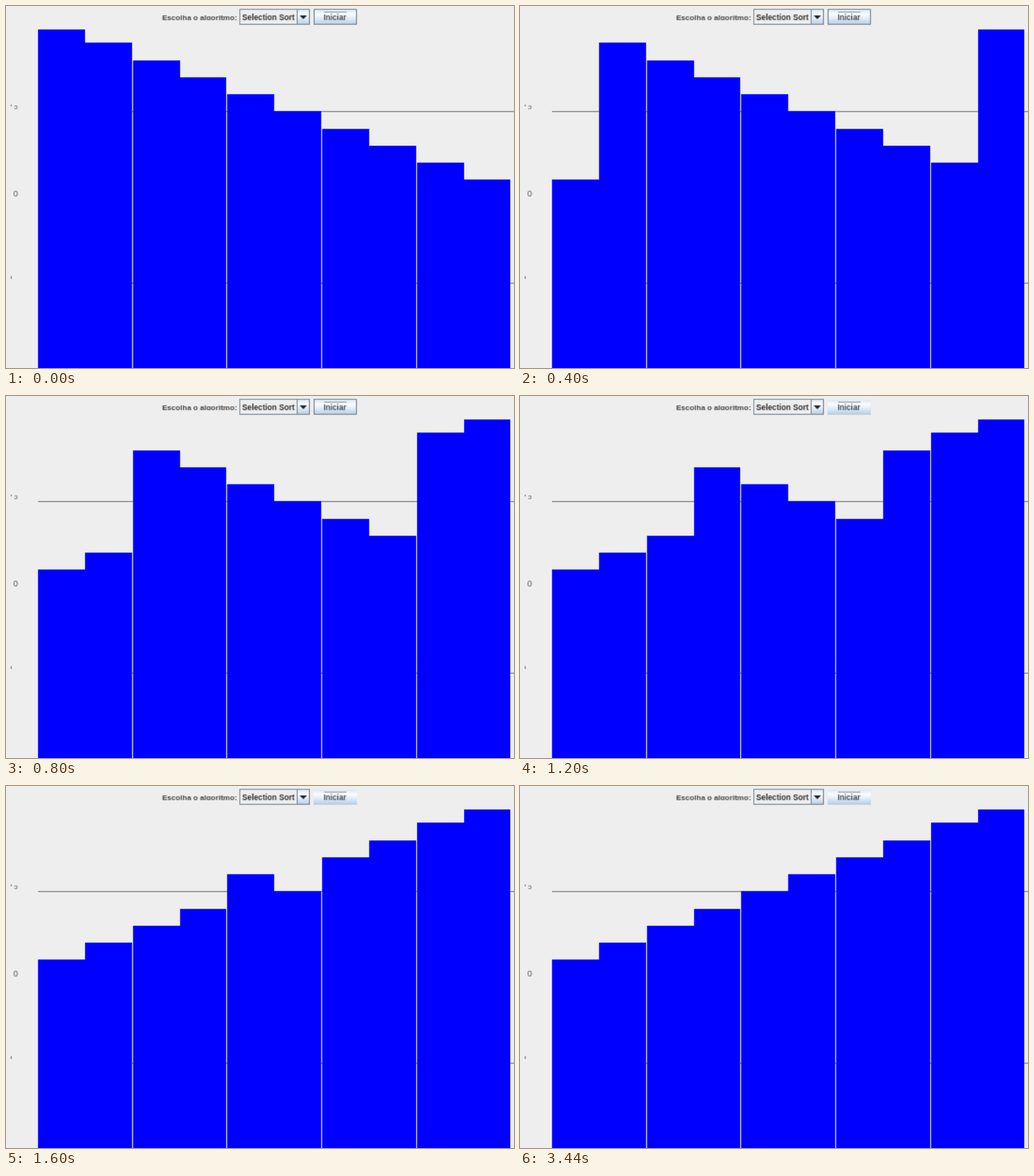
Recreate the animation shown at these times as an HTML page with a canvas. Size 756 px wide and 540 px high, loop 4.4 s.

```html
<!DOCTYPE html>
<html lang="pt">
<head>
<meta charset="utf-8">
<title>Selection Sort</title>
<style>
  html, body { margin: 0; width: 100%; height: 100%; overflow: hidden; background: #eee; }
  canvas { display: block; width: 756px; height: 540.4px; }
</style>
</head>
<body>
<!-- Drawn at a low resolution and enlarged 1.4 times for soft edges -->
<canvas id="stage" width="540" height="386"></canvas>
<script>
const ctx = document.getElementById('stage').getContext('2d');
const LOOP = 4400, STEP = 400;
const TOPS = [25, 39, 58, 76, 94, 112, 131, 149, 167, 185];

function rect(x, y, w, h, color) {
  ctx.fillStyle = color;
  ctx.fillRect(x, y, w, h);
}

function text(str, x, y, size, color, weight = 'bold') {
  ctx.font = `${weight} ${size}px "Liberation Sans", sans-serif`;
  ctx.fillStyle = color;
  ctx.fillText(str, x, y);
}

function frame(x, y, w, h, color) {
  ctx.strokeStyle = color;
  ctx.strokeRect(x + 0.5, y + 0.5, w - 1, h - 1);
}

function metal(x, y, w, h) {
  const g = ctx.createLinearGradient(0, y, 0, y + h);
  g.addColorStop(0, '#dce7f2');
  g.addColorStop(0.3, '#fafcfe');
  g.addColorStop(0.5, '#eaf1f8');
  g.addColorStop(1, '#b4cce3');
  rect(x, y, w, h, g);
}

function drawControls(pressed) {
  // The label's descender is cut off at the baseline
  ctx.save();
  ctx.beginPath();
  ctx.rect(164, 9, 83, 6);
  ctx.clip();
  text('Escolha o algoritmo:', 166, 15, 8.05, '#444');
  ctx.restore();

  metal(310, 4, 12, 16);
  frame(248, 3, 75, 17, '#7a8a99');
  rect(309, 3, 1, 17, '#7a8a99');
  text('Selection Sort', 251, 15, 8.3, '#333');
  ctx.fillStyle = '#222';
  ctx.beginPath();
  ctx.moveTo(312, 10);
  ctx.lineTo(320, 10);
  ctx.lineTo(316, 14);
  ctx.fill();

  metal(327, 4, 46, 16);
  if (!pressed) frame(327, 3, 46, 17, '#7a8a99');
  rect(338, 6, 24, 1, '#8d9cab');
  text('Iniciar', 337.5, 15, 8.2, '#46505a');
}

function drawAxis() {
  for (const y of [112, 295]) rect(34, y, 506, 1, '#808080');
  rect(5, 105, 1, 2, '#777');
  text('ɔ', 8.5, 110, 8, '#555', 'normal');
  text('0', 7.8, 203, 9, '#555', 'normal');
  rect(5, 288, 1, 3, '#777');
}

// Bars stand in pairs, with one pixel between pairs
const pairLeft = pair => Math.floor(34.4 + 100.67 * pair);

function drawBars(swaps) {
  TOPS.forEach((_, i) => {
    const swapped = Math.min(i, 9 - i) < swaps;
    const top = TOPS[swapped ? 9 - i : i];
    const pair = i >> 1;
    const middle = pairLeft(pair) + 50;
    const left = i % 2 ? middle : pairLeft(pair);
    const right = i % 2 ? pairLeft(pair + 1) - 1 : middle;
    rect(left, top, right - left, 386 - top, '#00f');
  });
}

function draw(now) {
  const swaps = Math.min(5, Math.floor((now % LOOP) / STEP));
  rect(0, 0, 540, 386, '#eee');
  drawControls(swaps >= 3);
  drawAxis();
  drawBars(swaps);
  requestAnimationFrame(() => draw(performance.now() - start));
}

const start = performance.now();
draw(0);
</script>
</body>
</html>
```
